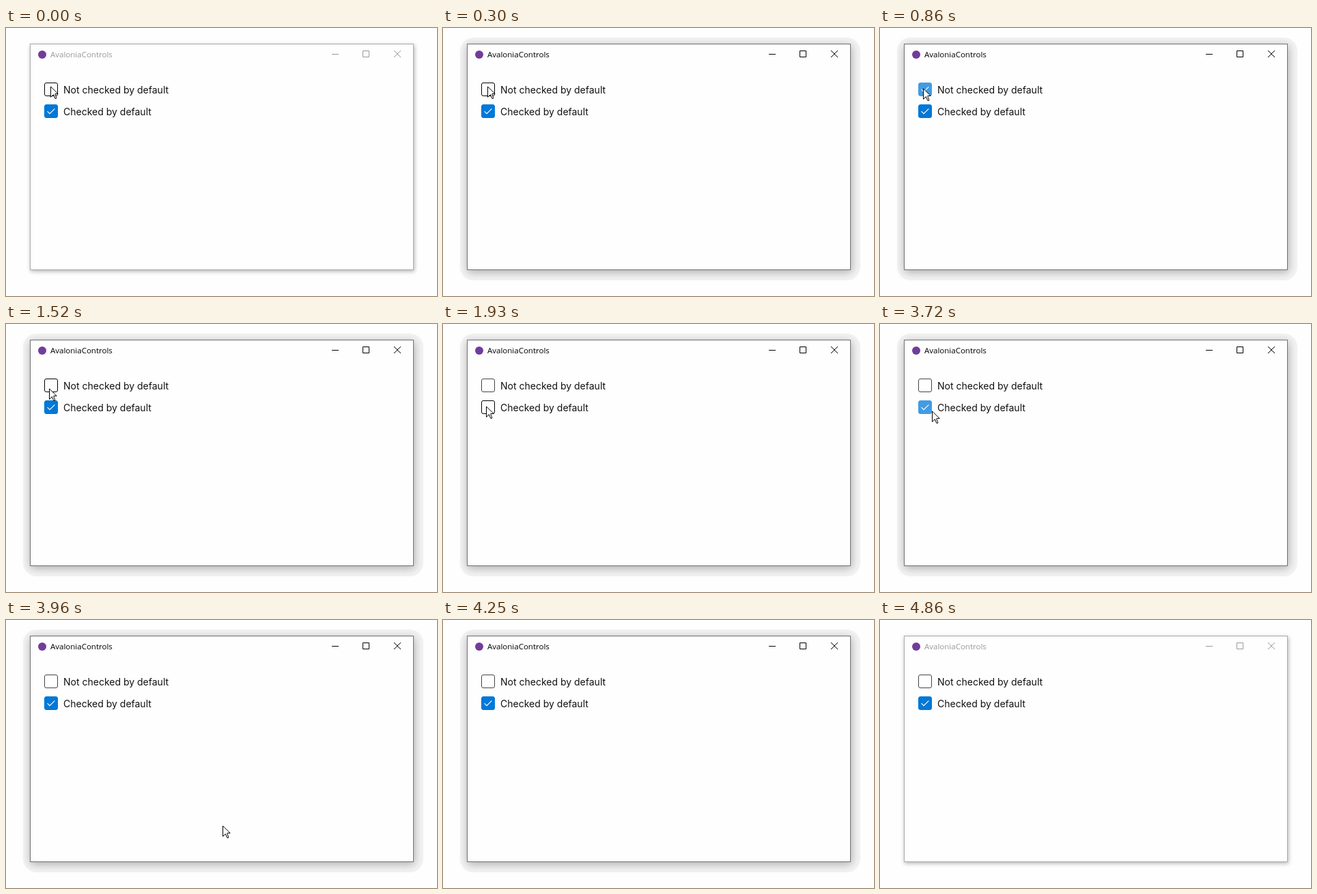
Recreate the animation shown at these times as an HTML page. Size 631x393 px, loop 4880 ms.

```html
<!DOCTYPE html>
<html lang="en">
<head>
<meta charset="utf-8">
<title>Check boxes</title>
<style>
html, body { margin: 0; width: 100%; height: 100%; overflow: hidden; background: #fefefe; }
svg, div { position: absolute; }
svg { left: 0; top: 0; }
#halo { left: 25px; top: 14px; width: 586px; height: 356px; border-radius: 20px; background: #f3f3f3; }
#win { left: 35px; top: 23px; width: 560px; height: 330px; background: #fefefe;
  border: 1px solid #707070; box-shadow: 1px 3px 12px rgba(0, 0, 0, .3); }
.idle #halo { display: none; }
.idle #win { border-color: #aaa; box-shadow: 1px 2px 6px rgba(0, 0, 0, .3); }
#bar { color: #000; }
.idle #bar { color: #999; }
#bar text { font: 11.5px "Open Sans", "Noto Sans", sans-serif; fill: currentColor; }
#bar path { fill: none; stroke: currentColor; }
.label { font: 14px Inter, sans-serif; fill: #111; }
.tick { fill: none; stroke: #fff; stroke-width: 1.1; }
</style>
</head>
<body>
<div id="halo"></div>
<div id="win"></div>
<svg width="631" height="393" viewBox="0 0 631 393">
  <circle cx="53" cy="39" r="6" fill="#713d9b"/>
  <g id="bar">
    <text x="65" y="43">AvaloniaControls</text>
    <path d="M477 38.5h10M522.5 33.5h9v9h-9zM568 33l10 10M578 33l-10 10"/>
  </g>
  <g id="boxes"></g>
  <path id="cursor" fill="#fff" stroke="#000" d="M.5 1V16.4L4.4 12.7L6.8 18.3H8.6V16.8L6.9 12.5V11.5H11.2Z"/>
</svg>
<script>
const LOOP = 4880;
const $ = id => document.getElementById(id);
const smooth = u => u * u * (3 - 2 * u);

// Press and release times for each check box
const items = [
  { text: "Not checked by default", y: 80, on: false, clicks: [[360, 480], [1230, 1350]] },
  { text: "Checked by default", y: 112, on: true, clicks: [[1870, 1930], [2590, 2720]] }
];

$("boxes").innerHTML = items.map(({ text, y }) => `
  <g transform="translate(56 ${y})">
    <rect x=".5" y=".5" width="19" height="19" rx="2.5"/>
    <path class="tick" d="M4.5 10.2L8 13.7L15.3 6.4"/>
    <text class="label" x="28" y="16">${text}</text>
  </g>`).join("");
const groups = [...$("boxes").children];

// Progress in n equal jumps, the first at the start time
const jumps = (t, start, end, n) =>
  Math.min(n, Math.floor((t - start) / (end - start) * n + 1e-6));

function pointer(t) {
  if (t < 860) return [65, 85];
  if (t < 1410) return [63, 88];
  if (t < 2050) return [63, Math.round(88 + 32 * smooth((jumps(t, 1410, 1750, 6) + 1) / 7))];
  if (t < 2100) return [63, 121];
  if (t < 2410) return [63, 122];
  if (t < 3720) return [64, 121];
  if (t >= 4250) return null;
  const u = jumps(t, 3720, 4190, 8) / 8;
  const s = (u + smooth(u)) / 2;
  const curve = (a, b, c) => Math.round((1 - s) ** 2 * a + 2 * s * (1 - s) * b + s * s * c);
  return [curve(76, 330, 530), curve(127, 345, 386)];
}

function paintBox(item, group, t, tip) {
  const [rect, tick] = group.children;
  const released = item.clicks.filter(([, up]) => t >= up).length;
  const on = item.on !== (released % 2 === 1);
  const pressed = item.clicks.some(([down, up]) => t >= down && t < up);
  const hover = tip && tip[0] < 213 && tip[1] >= item.y - 6 && tip[1] < item.y + 26;
  const blue = pressed ? "#005a9e" : hover ? "#429ce3" : "#0078d7";
  rect.setAttribute("fill", on ? blue : pressed ? "#999" : "#fefefe");
  rect.setAttribute("stroke", on ? blue : hover ? "#000" : "#444");
  tick.style.display = on ? "" : "none";
}

function draw(now) {
  const t = now % LOOP;
  const tip = pointer(t);
  document.body.className = t < 300 || t >= 4860 ? "idle" : "";
  items.forEach((item, i) => paintBox(item, groups[i], t, tip));
  $("cursor").style.display = tip ? "" : "none";
  if (tip) $("cursor").setAttribute("transform", `translate(${tip})`);
}

const start = performance.now();
function tick() {
  draw(performance.now() - start);
  requestAnimationFrame(tick);
}
tick();
</script>
</body>
</html>
```
